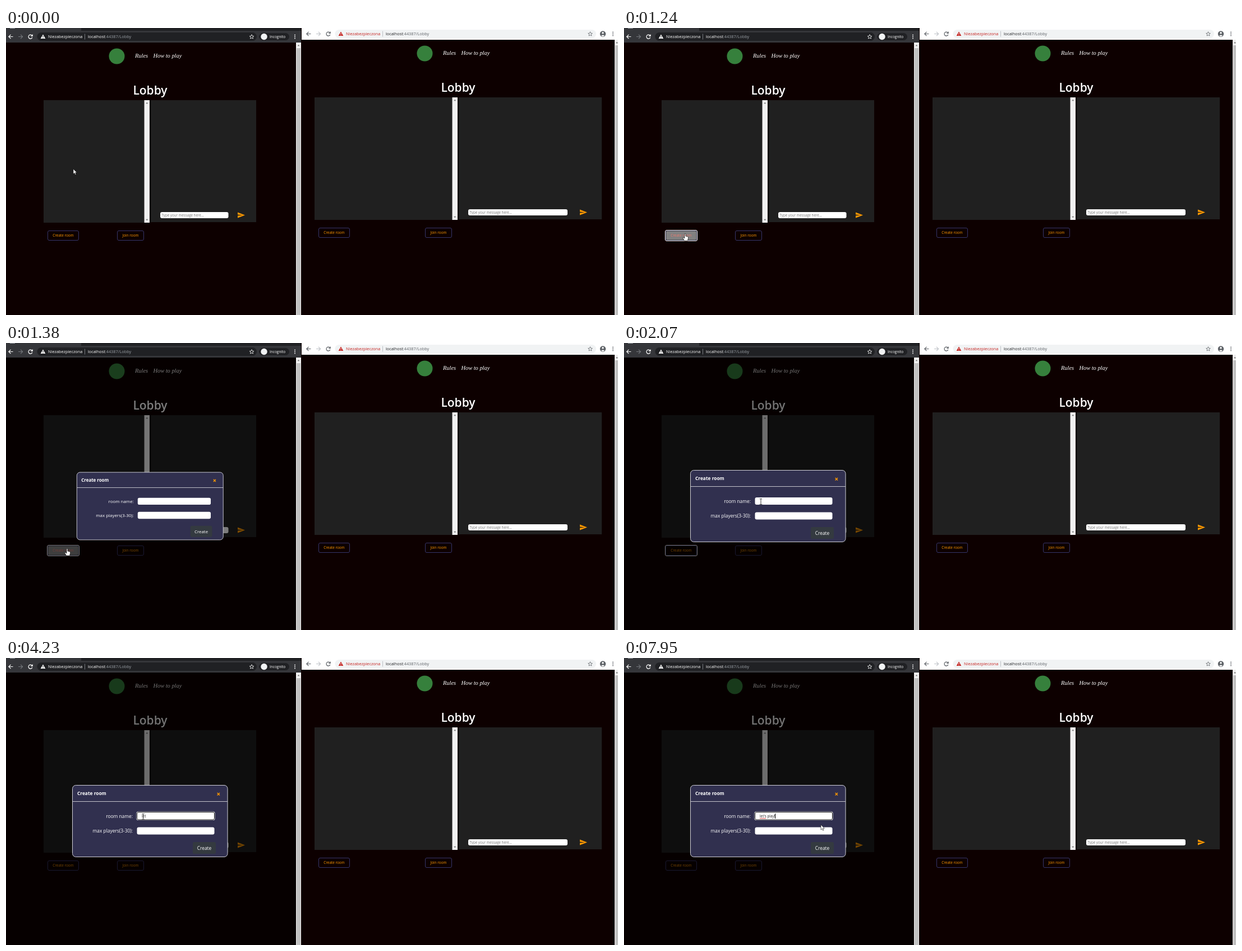
Animation, 1091 px wide and 513 px high, one loop 8000 ms. Source, as an HTML page with a canvas:

```html
<!DOCTYPE html>
<html lang="en">
<head>
<meta charset="utf-8">
<title>Lobby</title>
<style>
  html, body { margin: 0; width: 100%; height: 100%; overflow: hidden; background: #0d0000; }
  canvas { display: block; }
</style>
</head>
<body>
<canvas id="stage" width="1091" height="513"></canvas>
<script>
const ctx = document.getElementById('stage').getContext('2d');
const LOOP = 8000, TICK = 1000 / 13;
const SANS = '"Open Sans", "Noto Sans", sans-serif';
const SCRIPT = 'italic 10.4px "Liberation Serif", serif';
const ORANGE = '#ff9900';

const PRESS = 1150, OPEN = 1250, LEAVE = 1690, FOCUS = 2150, SPELLCHECK = 5400;
const ROOM_NAME = "let's play!";
const KEY_TIMES = [3390, 3470, 3700, 4460, 4940, 5400, 5630, 5700, 5870, 6250, 6710];

// time, x, y of the pointer
const POINTER = [
  [0, 120, 252], [69, 120, 252], [70, 119, 252], [310, 119, 252], [1000, 109, 367],
  [1615, 109, 367], [2070, 244, 283.5], [2600, 244, 283.5], [2690, 244.5, 283.5],
  [7700, 244.5, 283.5], [7769, 300, 287], [7846, 366, 308], [7923, 351, 298]
];

const clamp = v => Math.max(0, Math.min(1, v));

function rect(x, y, w, h, fill) {
  ctx.fillStyle = fill;
  ctx.fillRect(x, y, w, h);
}

function box(x, y, w, h, r, fill, stroke) {
  ctx.beginPath();
  ctx.roundRect(x, y, w, h, r);
  if (fill) { ctx.fillStyle = fill; ctx.fill(); }
  if (stroke) { ctx.lineWidth = 1; ctx.strokeStyle = stroke; ctx.stroke(); }
}

function dot(x, y, r, fill) {
  ctx.beginPath();
  ctx.arc(x, y, r, 0, 7);
  ctx.fillStyle = fill;
  ctx.fill();
}

function path(d, x, y, fill, stroke, width = 1) {
  const p = new Path2D(d);
  ctx.save();
  ctx.translate(x, y);
  if (fill) { ctx.fillStyle = fill; ctx.fill(p); }
  if (stroke) { ctx.lineWidth = width; ctx.strokeStyle = stroke; ctx.stroke(p); }
  ctx.restore();
}

function text(str, x, y, size, fill, align = 'left', weight = 400) {
  ctx.font = typeof size === 'string' ? size : `${weight} ${size}px ${SANS}`;
  ctx.textAlign = align;
  ctx.fillStyle = fill;
  ctx.fillText(str, x, y);
  return ctx.measureText(str).width;
}

function browserBar(x, y, right, c) {
  const ink = c.ink;
  path('M4 0H-3.5M0-3.7L-3.7 0L0 3.7', x + 8.5, y, null, ink, 1.2);
  path('M-4 0H3.5M0-3.7L3.7 0L0 3.7', x + 26, y, null, c.dim, 1.1);
  path('M3 -1.8A3.5 3.5 0 1 0 3.4 1.2M3.7-4V-1H.7', x + 43.5, y, null, ink, 1.2);
  box(x + 55.5, y - 7.5, right - x - 134.5 + c.pillExtra, 15, 7.5, c.pill);
  path('M0-4L4.3 3.6H-4.3Z', x + 66, y, c.warn);
  rect(x + 65.5, y - 1.5, 1, 2.7, c.pill);
  rect(x + 65.5, y + 1.9, 1, 1, c.pill);
  text('Niezabezpieczona', x + 75, y + 2.6, 7.35, c.warn);
  rect(x + 140, y - 5, 1, 10, c.dim);
  const w = text('localhost', x + 146, y + 2.6, 7.35, c.host);
  text(':44387/Lobby', x + 146 + w, y + 2.6, 7.35, c.rest);
  path('M0-3.8L1.1-1.2L3.8-1L1.8.8L2.4 3.5L0 2.1L-2.4 3.5L-1.8.8L-3.8-1L-1.1-1.2Z', c.star, y, null, ink, .8);
  for (const dy of [-3, 0, 3]) dot(right - 11, y + dy, .9, ink);
}

function scrollbar(x, y, w, h, thumb) {
  rect(x, y, w, h, '#f1f1f1');
  const mid = x + w / 2;
  path('M-2 1.2L0-1.2L2 1.2Z', mid, y + 5, '#777');
  if (thumb) rect(x + 1, y + 10, w - 2, h - 10, '#c1c1c1');
  else path('M-2-1.2L0 1.2L2-1.2Z', mid, y + h - 5, '#777');
}

function button(x, y, w, label) {
  box(x + .5, y + .5, w, 17, 2.5, null, '#35356a');
  text(label, x + .5 + w / 2, y + 11.3, 6.4, ORANGE, 'center');
}

function page(dx, dy, p) {
  dot(197.5 + dx, 50.5 + dy, 14, '#36803c');
  text('Rules', 230 + dx, 53 + dy, SCRIPT, '#fff');
  text('How to play', 262.5 + dx, 53 + dy, SCRIPT, '#fff');
  text('Lobby', 257 + dx, 119 + dy, 21, '#fff', 'center', 600);
  const top = 129 + dy;
  rect(p.list, top, p.bar - p.list, 219, '#202020');
  scrollbar(p.bar, top, 9.5, 219);
  rect(p.chat, top, p.chatEnd - p.chat, 218, '#202020');
  box(275 + dx, top + 200, p.inputW, 11, 3, '#fff');
  text('Type your message here...', 277.5 + dx, top + 208, 6.2, '#757575');
  path('M0 0L13 5L0 10V6.1L9 5L0 3.9Z', p.send, top + 200.5, ORANGE);
  button(p.create, 362 + dy, 55, 'Create room');
  button(p.join, 362 + dy, 47, 'Join room');
}

function pressedButton(t, overButton) {
  const hovered = overButton && t < LEAVE;
  if (hovered) {
    box(74.5, 362.5, 55, 17, 2.5, '#808080', '#33334f');
    text('Create room', 102, 373.3, 6.4, '#ee7a70', 'center');
  }
  if (t >= PRESS && t < FOCUS) box(73.5, 361.5, 57, 19, 2.5, null, '#fff');
}

function caretVisible(t, typed) {
  const since = typed ? KEY_TIMES[typed - 1] : FOCUS;
  return t >= FOCUS && Math.floor((t - since) / 530) % 2 === 0;
}

function roomField(t) {
  if (t >= FOCUS) {
    box(232.5, 274.5, 140, 15.5, 3, '#fff');
    box(233.5, 275.5, 138, 13.5, 2.5, null, '#101010');
  } else {
    box(233.5, 276, 138, 13, 3, '#fff');
  }
  const typed = KEY_TIMES.filter(k => k <= t).length;
  const w = text(ROOM_NAME.slice(0, typed), 242, 284.8, 6.35, '#222');
  if (caretVisible(t, typed)) rect(Math.round(242 + w), 278, 1, 9, '#000');
  if (t >= SPELLCHECK) path('M0 .5l1-1l1 1l1-1l1 1l1-1l1 1l1-1l1 1l1-1l1 1l1-1', 242, 286.7, null, '#e02020', .8);
}

function modal(t) {
  const p = clamp((t - OPEN) / 210);
  if (!p) return;
  rect(0, 26, 517, 487, `rgba(0,0,0,${.55 * Math.min(1, p * 1.5)})`);
  const scale = .85 + .15 * p;
  ctx.save();
  ctx.globalAlpha = clamp(p * 1.7);
  ctx.translate(256.75, 291.2);
  ctx.scale(scale, scale);
  ctx.translate(-256.75, -291.2);
  box(118.5, 227.5, 276.5, 128, 6, '#31304f', '#d0d0d8');
  rect(118.5, 256, 276.5, 1, '#c4c4cc');
  text('Create room', 127, 245.2, 8.35, '#fff', 'left', 700);
  path('M-2.2-2.2L2.2 2.2M2.2-2.2L-2.2 2.2', 378.8, 243.2, null, ORANGE, 1.4);
  text('room name:', 226, 285.6, 8.4, '#fff', 'right');
  text('max players(3-30):', 226, 312.2, 8.4, '#fff', 'right');
  roomField(t);
  box(233.5, 302.5, 138, 13, 3, '#fff');
  box(333, 329, 41, 21, 2.5, '#343a40');
  text('Create', 353.5, 342.5, 8.4, '#fff', 'center');
  ctx.restore();
}

function pointerAt(t) {
  const s = Math.floor((t + 8) / TICK) * TICK;
  const i = POINTER.findIndex(k => k[0] > s);
  if (i < 0) return POINTER[POINTER.length - 1].slice(1);
  const [t0, x0, y0] = POINTER[i - 1], [t1, x1, y1] = POINTER[i];
  const u = (s - t0) / (t1 - t0), e = u * u * (3 - 2 * u);
  return [x0 + (x1 - x0) * e, y0 + (y1 - y0) * e];
}

function drawPointer(t, x, y, overButton) {
  const overInput = t > OPEN && x > 233 && x < 372 && (y > 276 && y < 289 || y > 302 && y < 316);
  if (overInput) {
    path('M-2.2-5H-.6L0-4.5L.6-5H2.2M0-4.5V4.5M-2.2 5H-.6L0 4.5L.6 5H2.2', x, y, null, '#222', .9);
  } else if (overButton && t < LEAVE) {
    path('M-1 1Q0-.6 1 1V5L4.6 6Q6 6.5 5.6 8.5L4.6 13H-1.4L-4.2 8.6Q-4.4 7 -2.8 7.6L-1 9Z', x, y, '#fff', '#111', .7);
  } else {
    path('M0 0V9L2.1 7.1L3.5 10.3L5 9.7L3.6 6.6H6.3Z', x, y, '#fff', '#111', .6);
  }
}

function draw(t) {
  const [x, y] = pointerAt(t);
  const overButton = x > 74 && x < 130 && y > 362 && y < 380;

  rect(0, 0, 1091, 513, '#0d0000');
  rect(0, 0, 526, 26, '#35363a');
  rect(134, 0, 392, 5, '#202124');
  rect(7, 0, 9, 1, '#9aa0a6');
  browserBar(0, 15.5, 526, {
    ink: '#fff', dim: '#74777c', pill: '#202124', warn: '#fff',
    host: '#fff', rest: '#9aa0a6', star: 438, pillExtra: 0
  });
  box(451, 9, 54, 13, 6.5, '#202124');
  dot(460, 15.5, 5.7, '#f1f3f4');
  text('Incognito', 470, 18, 6.5, '#fff');
  page(0, 0, { list: 67, bar: 246.5, chat: 258.5, chatEnd: 446, inputW: 121.5, send: 413, create: 74, join: 198 });
  pressedButton(t, overButton);
  scrollbar(517, 26, 9, 487, true);

  rect(527, 0, 564, 21, '#fff');
  browserBar(531, 10.5, 1093, {
    ink: '#5f6368', dim: '#bdc1c6', pill: '#f1f3f4', warn: '#c5221f',
    host: '#202124', rest: '#5f6368', star: 1041.5, pillExtra: 38
  });
  dot(1064, 10.5, 5.2, '#5f6368');
  dot(1064, 8.8, 1.7, '#fff');
  path('M-3 1.6Q0-1.2 3 1.6Q0 4.4-3 1.6Z', 1064, 12.2, '#fff');
  page(549, -5, { list: 550, bar: 795.5, chat: 807.5, chatEnd: 1062, inputW: 177, send: 1023, create: 557, join: 747 });
  scrollbar(1085, 21, 8, 492, true);

  modal(t);
  drawPointer(t, x, y, overButton);
}

function loop(now) {
  draw(now % LOOP);
  requestAnimationFrame(loop);
}
requestAnimationFrame(loop);
</script>
</body>
</html>
```
